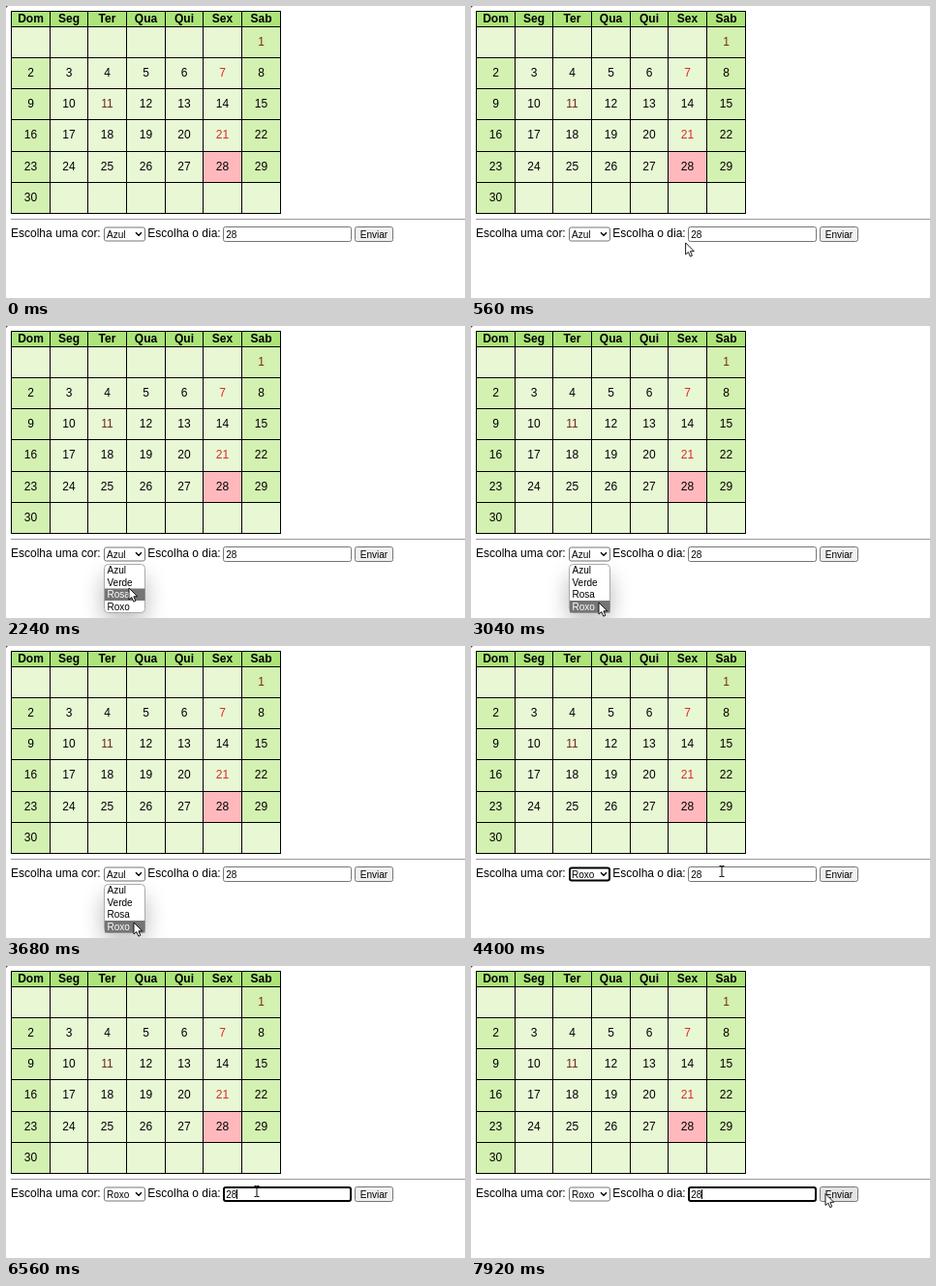
An HTML page that plays this animation: 474 by 302 pixels, repeating every 8 s.

```html
<!DOCTYPE html>
<html lang="pt">
<head>
<meta charset="utf-8">
<title>Calendário</title>
<style>
  html, body { margin: 0; width: 100%; height: 100%; overflow: hidden; background: #fff; }
  svg { display: block; width: 100%; height: 100%; font: 12px "Liberation Sans", Arial, sans-serif; }
  .small { font-size: 10px; }
  .grid { shape-rendering: crispEdges; }
</style>
</head>
<body>
<svg id="stage" viewBox="0 0 474 302">
  <defs>
    <filter id="blur" x="-150%" y="-150%" width="400%" height="400%">
      <feGaussianBlur stdDeviation="11"/>
    </filter>
  </defs>
  <path d="M0 0H2L0 2Z" fill="#444"/>
  <g id="calendar"></g>
  <path class="grid" d="M5 220.5H474" stroke="#999"/>
  <text x="5" y="239">Escolha uma cor:</text>
  <text x="146.3" y="239">Escolha o dia:</text>

  <rect id="select" fill="#fff"/>
  <text id="choice" class="small" x="104" y="239.5"></text>
  <path d="M134 234.3L137 237.3L140 234.3" fill="none" stroke="#000" stroke-width="1.5"/>

  <rect id="input" fill="#fff"/>
  <text class="small" x="227.3" y="239.5">28</text>
  <path id="caret" class="grid" d="M238.5 231V241" stroke="#000"/>

  <rect id="button" x="360.5" y="228.5" width="39" height="15" rx="2" stroke="#767676"/>
  <text class="small" x="380" y="239.5" text-anchor="middle">Enviar</text>

  <g id="menu">
    <rect x="100" y="258" width="45" height="48" rx="8" fill="#000" opacity=".26" filter="url(#blur)"/>
    <rect x="101.5" y="246.5" width="42" height="50" rx="4" fill="#fff" stroke="#aaa"/>
    <rect id="bar" x="102" width="41.5" height="12.5" fill="#757575"/>
    <g id="options" class="small"></g>
  </g>

  <path id="arrow" d="M0 0V12L2.8 9.6L4.8 14.2L6.8 13.3L4.9 8.8H8.7Z" fill="#fff" stroke="#000" stroke-width=".9"/>
  <path id="beam" d="M-2.5 -5.5H-.7L0 -5L.7 -5.5H2.5M0 -5V5M-2.5 5.5H-.7L0 5L.7 5.5H2.5" fill="none" stroke="#000"/>
</svg>
<script>
const LOOP = 8000;
const OPEN = 1440, PICK = 3760, FOCUS = 4560;
const COLORS = ["Azul", "Verde", "Rosa", "Roxo"];
const $ = id => document.getElementById(id);

function add(parent, tag, attrs, text) {
  const el = document.createElementNS("http://www.w3.org/2000/svg", tag);
  set(el, attrs);
  if (text !== undefined) el.textContent = text;
  parent.appendChild(el);
  return el;
}

function set(el, attrs) {
  for (const key in attrs) el.setAttribute(key, attrs[key]);
}

function show(el, on) {
  el.style.display = on ? "" : "none";
}

function buildCalendar() {
  const cols = [5, 45, 84, 124, 164, 203, 243, 283];
  const rows = [5, 21, 53, 85, 117, 150, 182, 214];
  const names = ["Dom", "Seg", "Ter", "Qua", "Qui", "Sex", "Sab"];
  const ink = { 1: "#7a2a18", 7: "#dc2a20", 11: "#6e2a18", 21: "#dc2a20" };
  const table = $("calendar");
  for (let r = 0; r < 7; r++) {
    for (let c = 0; c < 7; c++) {
      const day = (r - 1) * 7 + c - 5;
      const weekend = c === 0 || c === 6;
      const filled = r > 0 && day > 0 && day <= 30;
      const fill = r === 0 ? "#ace47a"
        : day === 28 ? "#ffb9bd"
        : weekend && (filled) ? "#d3f1b1" : "#e8f8d5";
      const x = cols[c], y = rows[r];
      const w = cols[c + 1] - x, h = rows[r + 1] - y;
      add(table, "rect", {
        class: "grid", x: x + .5, y: y + .5, width: w, height: h, fill, stroke: "#000"
      });
      if (r === 0 || filled) {
        add(table, "text", {
          x: x + w / 2 + .5,
          y: r === 0 ? 17 : y + 20,
          "text-anchor": "middle",
          "font-weight": r === 0 ? "bold" : "normal",
          fill: ink[r && day] || "#000"
        }, r === 0 ? names[c] : day);
      }
    }
  }
}

// Pointer stops: time, x, y
const path = [
  [80, 412, 267], [880, 119, 233], [1500, 119, 233],
  [2160, 127, 271], [2600, 127, 271], [2960, 132, 286],
  [3800, 132, 286], [4320, 259, 233], [7240, 259, 233],
  [7800, 366, 235.5], [LOOP, 366, 235.5]
];

function pointer(t) {
  let i = 1;
  while (i < path.length - 1 && t > path[i][0]) i++;
  const [t0, x0, y0] = path[i - 1], [t1, x1, y1] = path[i];
  const p = Math.min(1, Math.max(0, (t - t0) / (t1 - t0)));
  const e = p * p * (3 - 2 * p);
  return [x0 + (x1 - x0) * e, y0 + (y1 - y0) * e];
}

function field(el, x, y, w, h, focused) {
  const line = focused ? 2 : 1;
  set(el, {
    x: x + line / 2, y: y + line / 2, width: w - line, height: h - line,
    rx: 2, stroke: focused ? "#000" : "#767676", "stroke-width": line
  });
}

function draw(t) {
  const [x, y] = pointer(t);
  const inRow = y > 228 && y < 244;
  const overInput = inRow && x > 224 && x < 357;
  const overButton = inRow && x > 360 && x < 400;
  const open = t >= OPEN && t < PICK;
  const typing = t >= FOCUS;

  field($("select"), 101, 228.5, 43, 15, t >= PICK && !typing);
  field($("input"), 224, 228, 133, 16, typing);
  $("choice").textContent = t < PICK ? "Azul" : "Roxo";
  show($("caret"), typing && (t - FOCUS) % 1000 < 500);
  set($("button"), { fill: overButton ? "#e3e3e3" : "#efefef" });

  show($("menu"), open);
  const active = Math.max(0, Math.min(3, Math.floor((y - 246) / 12.5)));
  set($("bar"), { y: 246.5 + active * 12.5 });
  options.forEach((el, i) => set(el, { fill: i === active ? "#fff" : "#000" }));

  show($("arrow"), t >= 80 && !overInput);
  show($("beam"), t >= 80 && overInput);
  const place = { transform: `translate(${x} ${y})` };
  set($("arrow"), place);
  set($("beam"), place);
}

buildCalendar();
const options = COLORS.map((name, i) =>
  add($("options"), "text", { x: 104.5, y: 256 + i * 12.5 }, name));

const start = performance.now();
function tick() {
  draw((performance.now() - start) % LOOP);
  requestAnimationFrame(tick);
}
tick();
</script>
</body>
</html>
```
